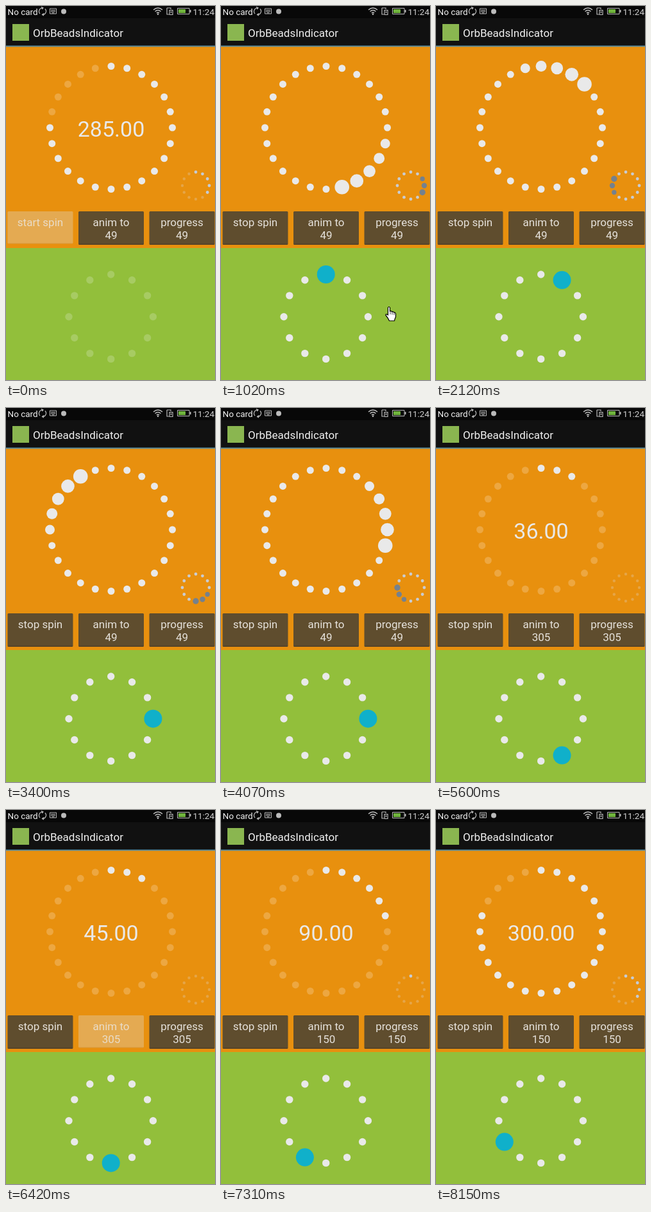
Animation, 326 px wide and 581 px high, one loop 9.02 s. Source, as an HTML page with a canvas:

```html
<!DOCTYPE html>
<html lang="en">
<head>
<meta charset="utf-8">
<title>Dot progress demo</title>
<style>
  html, body { margin: 0; width: 100%; height: 100%; overflow: hidden; background: #000; }
  canvas { display: block; width: 326px; height: 581px; }
</style>
</head>
<body>
<canvas id="stage"></canvas>
<script>
const LOOP = 9020, SPIN = 300, FIRST = 4760, PRESS = 6420, SECOND = 7020;
const LIGHT = '#e9e9e9';
const canvas = document.getElementById('stage');
const ctx = canvas.getContext('2d');
const scale = window.devicePixelRatio || 1;
canvas.width = 326 * scale;
canvas.height = 581 * scale;
ctx.scale(scale, scale);

function rect(x, y, w, h, color, radius = 0) {
  ctx.fillStyle = color;
  ctx.beginPath();
  ctx.roundRect(x, y, w, h, radius);
  ctx.fill();
}

function dot(x, y, r, color) {
  ctx.fillStyle = color;
  ctx.beginPath();
  ctx.arc(x, y, r, 0, Math.PI * 2);
  ctx.fill();
}

function text(str, x, y, size, color, align = 'left') {
  ctx.font = `${size}px Roboto, sans-serif`;
  ctx.textAlign = align;
  ctx.fillStyle = color;
  ctx.fillText(str, x, y);
}

function stroke(d, color, width = 1) {
  ctx.strokeStyle = color;
  ctx.lineWidth = width;
  ctx.stroke(new Path2D(d));
}

// Dots run clockwise from the top; style(i) gives [radius, color].
function ring(cx, cy, radius, count, style) {
  for (let i = 0; i < count; i++) {
    const a = i / count * Math.PI * 2;
    dot(cx + radius * Math.sin(a), cy - radius * Math.cos(a), ...style(i));
  }
}

function statusBar() {
  rect(0, 0, 326, 19, '#080808');
  text('No card', 2.5, 13.5, 13.5, '#f2f2f2');
  stroke('M53 12A5.3 5.3 0 0 1 57 3M61 4.500A5.300 5.300 0 0 1 57 13.500M55 1.500L58 3L56 5M59 11.500L56.500 13.500L59 15', '#bbb', 1.2);
  stroke('M68.500 4H78.500V12H68.500ZM70 6.500H77M70 8.500H77M71.500 10.500H75.500', '#bbb');
  dot(90, 8.5, 4, '#bbb');
  stroke('M230 6Q237 0 244 6M232.500 8.500Q237 4.500 241.500 8.500M235 11Q237 9 239 11', '#bbb', 1.6);
  dot(237, 12.7, 1.3, '#bbb');
  stroke('M251 3H257V5M251 3V13H254M255 6.500H260V13.500H255ZM257.500 8V11', '#bbb', 1.2);
  stroke('M267.500 3.500H286V12.500H267.500Z', '#bbb');
  rect(286.5, 6, 2, 4, '#bbb');
  rect(269, 5, 11, 6, '#6fb33c');
  text('11:24', 325, 13.5, 13.5, '#d0d0d0', 'right');
}

function titleBar() {
  rect(0, 19, 326, 43, '#111');
  rect(10, 28, 26, 26, '#8ab650');
  text('OrbBeadsIndicator', 42, 48, 17, '#f0f0f0');
}

function button(x, lines, pressed) {
  rect(x, 319, 102, pressed ? 50 : 52, pressed ? '#e4aa52' : '#5f4d2e', 1.5);
  rect(x + 1, pressed ? 368.5 : 369.5, 100, 1, pressed ? '#d99a3c' : '#4c3d25');
  lines.forEach((line, i) =>
    text(line, x + 51, 342 + i * 19.5, 17, pressed ? '#e9dcc8' : '#e6e2dc', 'center'));
}

function cursor() {
  const hand = new Path2D('M260.500 468.500Q262 466 263.500 468.500V474Q265.500 473 266.500 475Q268.500 474 269.500 476Q272 475.500 272.500 478V483Q271 486 270.500 489H262.500Q261 485 257 480.500Q256.500 477.500 260.500 480Z');
  ctx.fillStyle = '#fff';
  ctx.fill(hand);
  ctx.strokeStyle = '#000';
  ctx.lineWidth = 1.2;
  ctx.stroke(hand);
  stroke('M264 474V479M267 475V479.500M270 476.500V480', '#000', 0.8);
}

// Every run takes twenty equal increments, shown in eight ticks.
function run(target, elapsed, tick) {
  const step = Math.min(20, 1 + Math.floor(2.5 * Math.floor(elapsed / tick)));
  return target * step / 20;
}

function progressAt(t) {
  if (t < SPIN) return 285;
  return t < SECOND ? run(45, t - FIRST, 137.5) : run(300, t - SECOND, 141);
}

function drawSpin(t) {
  const tick = Math.floor((t - SPIN) / 140);
  const head = Math.floor(2.1 * tick + 0.6);
  const smallHead = Math.floor(0.833 * tick + 0.1);
  ring(164, 189, 95.5, 24, i => {
    const behind = (head - i + 240) % 24;
    return [behind < 5 ? 11.3 - behind * 0.95 : 5.5, LIGHT];
  });
  ring(296, 279, 21, 12, i => {
    const behind = (smallHead - i + 120) % 12;
    return behind < 3 ? [4.7 - behind * 0.5, '#75818d'] : [2.4, '#c9ccd2'];
  });
}

function drawProgress(t) {
  const value = progressAt(t);
  ring(164, 189, 95.5, 24, i => [5.5, i < value / 15 ? LIGHT : '#eda741']);
  const lit = Math.floor(value / 54);
  ring(296, 279, 21, 12, i => i < lit ? [2.4, '#c5ccd6'] : [2.2, '#e5a548']);
  text(value.toFixed(2).padStart(5, '0'), 164, 202.5, 34, LIGHT, 'center');
}

function draw(t) {
  const spinning = t >= SPIN && t < FIRST;
  statusBar();
  titleBar();
  rect(0, 61.5, 326, 2, '#5a8ea0');
  rect(0, 63.5, 326, 312.5, '#e8900e');
  rect(0, 376, 326, 205, '#92bf3b');

  if (spinning) drawSpin(t); else drawProgress(t);

  const goal = t < FIRST ? '49' : t < SECOND ? '305' : '150';
  const animPressed = (t >= 4340 && t < FIRST) || (t >= PRESS && t < SECOND);
  button(2.5, [t < SPIN ? 'start spin' : 'stop spin'], t < SPIN);
  button(113, ['anim to', goal], animPressed);
  button(223.5, ['progress', goal], false);

  const head = t < SPIN ? -1 : Math.floor((t - 200) / 990);
  ring(163.7, 482.7, 65.7, 12, i =>
    i === head ? [14, '#10b0ca'] : [5.7, head < 0 ? '#a7cb63' : LIGHT]);

  if (t >= 870 && t < 1290) cursor();
}

const start = performance.now();
function frame() {
  draw((performance.now() - start) % LOOP);
  requestAnimationFrame(frame);
}
frame();
</script>
</body>
</html>
```
